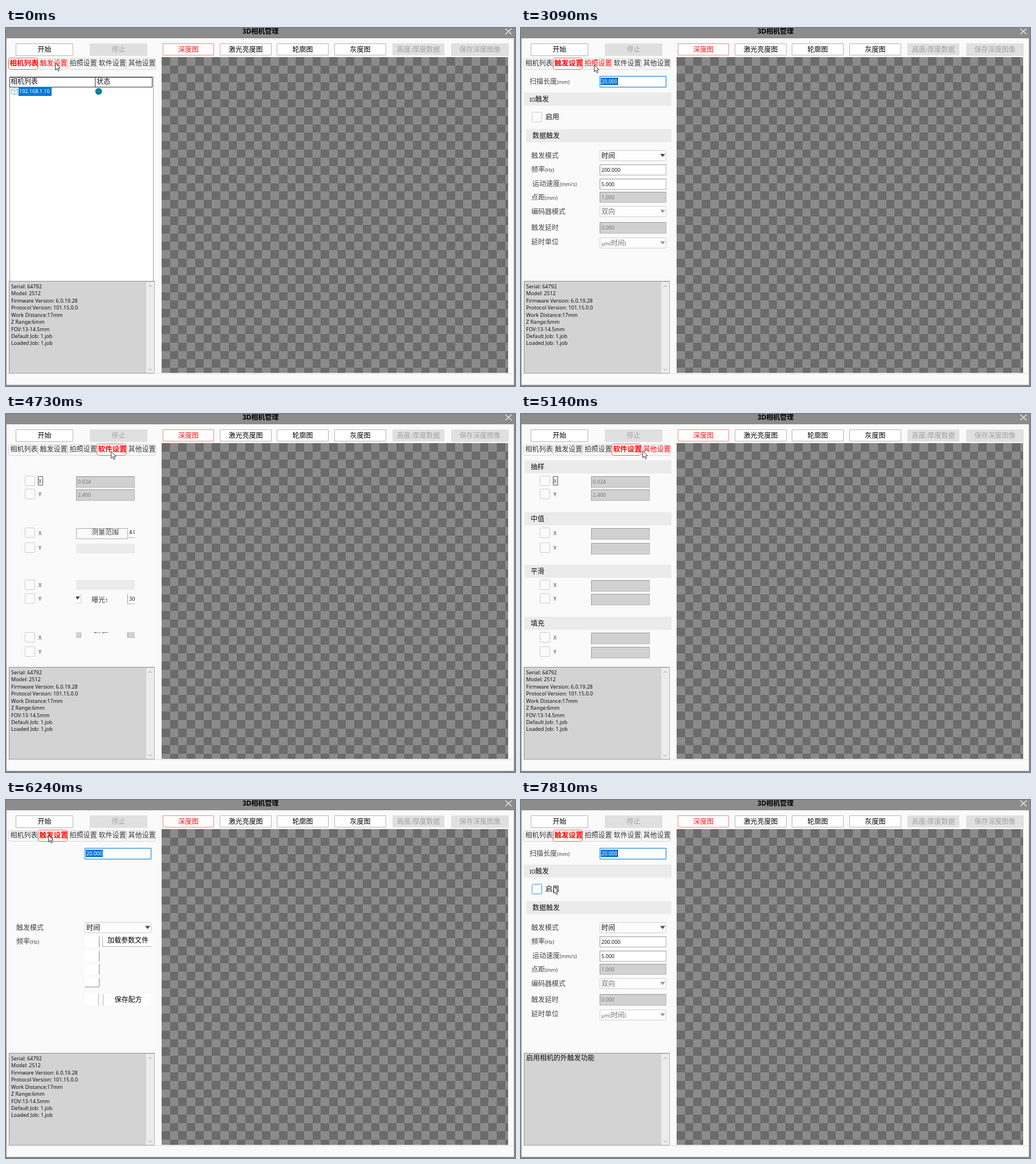
An HTML page with a canvas that plays this animation: 893x627 px, repeating every 8000 ms.

```html
<!DOCTYPE html>
<html lang="zh-CN">
<head>
<meta charset="utf-8">
<style>
html, body { margin: 0; width: 100%; height: 100%; overflow: hidden; background: #fafafa; }
canvas { display: block; }
</style>
</head>
<body>
<canvas id="stage" width="893" height="627"></canvas>
<script>
const ctx = document.getElementById('stage').getContext('2d');
const LOOP = 8000, STEP = 70;
const FONT = '"Noto Sans", "Noto Sans CJK SC", "Noto Sans CJK", sans-serif';
const BG = '#fafafa', LABEL = '#444', DIM = '#777', BLUE = '#0078d7', RED = '#f00';

// ---------- helpers ----------
function box(x, y, x2, y2, fill, stroke, r = 0) {
  ctx.beginPath();
  ctx.roundRect(x + .5, y + .5, x2 - x - 1, y2 - y - 1, r);
  if (fill) {
    ctx.fillStyle = fill;
    if (stroke || r) ctx.fill(); else ctx.fillRect(x, y, x2 - x, y2 - y);
  }
  if (stroke) { ctx.strokeStyle = stroke; ctx.lineWidth = 1; ctx.stroke(); }
}

function poly(points, fill, stroke, width = 1) {
  ctx.beginPath();
  points.forEach(([x, y]) => ctx.lineTo(x, y));
  if (fill) { ctx.closePath(); ctx.fillStyle = fill; ctx.fill(); }
  if (stroke) { ctx.strokeStyle = stroke; ctx.lineWidth = width; ctx.stroke(); }
}

// Latin runs are set smaller than Chinese ones; y is the middle of the line.
function text(str, x, y, color = '#111', { size = 12, small = 9, bold, center } = {}) {
  const runs = str.match(/[\x00-\xff]+|[^\x00-\xff]+/g) || [];
  const setFont = run =>
    ctx.font = `${bold ? 'bold ' : ''}${run.charCodeAt(0) < 256 ? small : size}px ${FONT}`;
  const widths = runs.map(run => (setFont(run), ctx.measureText(run).width));
  const hasChinese = /[^\x00-\xff]/.test(str);
  if (center) x -= widths.reduce((a, b) => a + b, 0) / 2;
  ctx.fillStyle = color;
  runs.forEach((run, i) => {
    setFont(run);
    ctx.fillText(run, x, Math.round(y + (hasChinese ? 4.3 : 3.3)));
    x += widths[i];
  });
}

function clipped(rects, draw) {
  ctx.save();
  ctx.beginPath();
  rects.forEach(([x, y, x2, y2]) => ctx.rect(x, y, x2 - x, y2 - y));
  ctx.clip();
  draw();
  ctx.restore();
}

// What is left of the previous page inside controls not yet repainted.
const leftover = (page, rects) => clipped(rects, () => {
  box(0, 75, 270, 443, BG);
  page();
});

function button(x, y, x2, y2, label, style = '') {
  const off = style === 'off', on = style === 'on';
  box(x, y, x2, y2, off ? '#e0e0e0' : '#fff', off ? '' : on ? '#f08888' : '#b4b4b4');
  text(label, (x + x2) / 2, (y + y2) / 2, off ? '#a2a2a2' : on ? '#f01818' : '#000', { center: true });
}

function bar(x, y, label, labelX) {
  box(x, y, 264, y + 23, '#ebebeb');
  text(label, labelX, y + 12);
}

function input(x, y, x2, y2, value = '', off) {
  box(x, y, x2, y2, off ? '#d1d1d1' : '#fff', off ? '#b8b8b8' : '#b0b0b0');
  poly([[x + .5, y2], [x + .5, y + .5], [x2, y + .5]], '', '#999');
  text(value, x + 3, (y + y2) / 2, off ? DIM : '#111');
}

function combo(x, y, x2, y2, value, off) {
  box(x, y, x2, y2, '#fdfdfd', '#cfcfcf', 1);
  const cy = (y + y2) / 2;
  poly([[x2 - 11, cy - 3], [x2 - 2, cy - 3], [x2 - 6.5, cy + 2.5]], off ? '#999' : '#54435f');
  text(value, x + 3, cy, off ? '#707070' : '#111');
}

const check = (x, y, hot) => box(x, y, x + 18, y + 18, '#fbfbfb', hot ? '#3c96d8' : '#cbcbcb', 1);

function selected(value, x, y, x2, y2) {
  box(x, y, x2, y2, BLUE);
  text(value, x + 1, (y + y2) / 2, '#fff');
}

// ---------- pages ----------
function listPage() {
  box(6, 85, 259, 443, '#fff');
  poly([[6.5, 443], [6.5, 85.5], [258.5, 85.5], [258.5, 443]], '', '#9a9a9a');
  box(6, 86, 257, 104, '#fff', '#333');
  box(156, 86, 157, 104, '#333');
  text('相机列表', 8, 94);
  text('状态', 159, 94);
  poly([[15, 105], [20.5, 107.5], [20.5, 114], [15, 117], [9.5, 114], [9.5, 107.5], [15, 105]], '', '#5b9bc8', .8);
  poly([[9.5, 107.5], [15, 110], [20.5, 107.5]], '', '#5b9bc8', .8);
  poly([[15, 110], [15, 117]], '', '#5b9bc8', .8);
  selected('192.168.1.10', 22, 103, 80, 119);
  ctx.beginPath();
  ctx.arc(162.5, 111, 6, 0, 7);
  ctx.fillStyle = '#0c8296';
  ctx.fill();
}

const triggerInputs = [
  [239, 258, '200.000'], [264, 283, '5.000'], [287, 306, '1.000', true], [340, 360, '0.000', true]
];
const triggerLabels = [
  ['触发模式', 18, 224], ['频率(Hz)', 18, 248], ['运动速度(mm/s)', 20, 273], ['点距(mm)', 18, 297],
  ['编码器模式', 18, 322], ['触发延时', 18, 350], ['延时单位', 18, 375]
];

function triggerPage({ partial, previous, caret, hot } = {}) {
  box(138, 84, 255, 104, '#fff', BLUE);
  selected('20.000', 140, 87, 170, 100);
  if (caret) box(169, 87, 170, 99, '#111');
  combo(138, 214, 255, 233, '时间');
  triggerLabels.slice(0, partial ? 2 : 7).forEach(([s, x, y]) => text(s, x, y, LABEL));
  if (partial) {
    leftover(previous, [...triggerInputs.map(([y, y2]) => [138, y, 255, y2]), [138, 312, 255, 331]]);
    return;
  }
  text('扫描长度(mm)', 15, 94, LABEL);
  bar(5, 113, 'IO触发', 15);
  check(19, 147, hot);
  text('启用', 43, 156);
  bar(9, 177, '数据触发', 20);
  triggerInputs.forEach(([y, y2, value, off]) => input(138, y, 255, y2, value, off));
  combo(138, 312, 255, 331, '双向', true);
  combo(138, 367, 255, 386, 'µm(时间)', true);
}

function photoPage() {
  bar(6, 81, '有效区域', 17);
  text('测量范围', 150, 207, LABEL);
  input(213, 196, 262, 217, '4.000');
  bar(6, 225, '间隔', 17);
  bar(6, 288, '曝光', 17);
  text('模式', 18, 325, LABEL);
  combo(60, 313, 132, 332, '单次');
  text('曝光1', 150, 326, LABEL);
  input(213, 314, 262, 333, '30');
  text('步数', 18, 380, LABEL);
  input(60, 372, 132, 392, '', true);
  text('曝光2', 150, 379, LABEL);
  input(213, 372, 262, 392, '', true);
}

const softRows = [109, 132, 200, 226, 291, 315, 383, 408];

function softPage({ partial, previous } = {}) {
  softRows.forEach((y, i) => {
    check(33, y - 1, false);
    text('XY'[i % 2], 57, y + 8.5, '#5b2b4b');
    if (i < 2 || !partial) input(123, y, 226, y + 20, ['0.024', '2.400'][i], true);
  });
  box(56, 109, 65, 125, '', '#555');
  if (partial) {
    leftover(previous, [[123, 200, 226, 219], [123, 227, 226, 244], [123, 291, 226, 308],
      [123, 315, 226, 333], [123, 382, 226, 392]]);
    box(123, 200, 214, 219, '', '#aaa');
  } else {
    ['抽样', '中值', '平滑', '填充'].forEach((s, i) => bar(6, 81 + 91.5 * i | 0, s, 17));
  }
}

const programs = ['1', '122', '22', '33', '4444', '8975222', 'VISIONAssembly', '哦', '我', '问问'];

function otherPage({ caret } = {}) {
  bar(6, 81, '配方', 17);
  text('当前配方', 18, 121, LABEL);
  box(79, 111, 163, 133, '#d3d3d3', '#3a96dd');
  selected('1', 81, 114, 88, 127);
  if (caret) box(88, 114, 89, 127, '#111');
  box(18, 140, 164, 328, '#fff', '#8a8a8a');
  const shade = ctx.createLinearGradient(0, 142, 0, 159);
  shade.addColorStop(0, '#a6a6a6');
  shade.addColorStop(1, '#707070');
  box(19, 142, 163, 160, shade, '#666');
  box(62, 142, 63, 159, '#444');
  text('No.', 22, 151, '#f2f2f2');
  text('Program', 65, 151, '#f2f2f2');
  programs.forEach((name, i) => {
    const y = 168.5 + 15.4 * i;
    text(String(i), 24, y);
    text(name, 67, y);
  });
  ['切换配方', '删除配方', '保存参数文件', '加载参数文件'].forEach((s, i) => {
    const y = Math.round(141 + 31.3 * i);
    button(169, y, 259, y + 22, s);
  });
  text('名称', 18, 348, LABEL);
  input(79, 339, 163, 361);
  button(170, 339, 259, 361, '保存配方');
}

// ---------- timeline ----------
// start, page, tab index, time spent half repainted
const visits = [
  [0, listPage, 0, 0], [670, triggerPage, 1, 70], [3430, photoPage, 2, 0],
  [4660, softPage, 3, 140], [5400, otherPage, 4, 0], [6240, triggerPage, 1, 70]
];
// start, end, x, y reached
const moves = [
  [1210, 1410, 90, 66], [2000, 2270, 76, 68], [2470, 3090, 128, 64], [4040, 4600, 184, 65],
  [4870, 5400, 238, 64], [5540, 5610, 257, 64], [5680, 6090, 74, 61], [6640, 7260, 48, 146],
  [7460, 7810, 57, 151]
];

function cursorAt(t) {
  let x = 86, y = 61;
  for (const [start, end, toX, toY] of moves) {
    if (t < start) break;
    const held = (Math.floor((t - start) / STEP) + 1) * STEP;
    const p = Math.min(1, held / (end - start));
    const eased = p * p * (3 - 2 * p);
    x += (toX - x) * eased;
    y += (toY - y) * eased;
  }
  return [Math.round(x), Math.round(y)];
}

// ---------- window parts ----------
function windowFrame() {
  box(0, 0, 893, 627, '#8c8c8c');
  box(1, 18, 891, 625, BG);
  text('3D相机管理', 446.5, 6, '#000', { bold: true, small: 12, center: true });
  poly([[876, 1], [887, 11]], '', '#f4f4f4', 1.1);
  poly([[887, 1], [876, 11]], '', '#f4f4f4', 1.1);
  box(1, 605, 891, 606, '#dcdcdc');
  button(17, 27, 118, 49, '开始');
  button(147, 27, 248, 49, '停止', 'off');
  button(275, 27, 365, 48, '深度图', 'on');
  button(375, 27, 466, 48, '激光亮度图');
  button(475, 27, 566, 48, '轮廓图');
  button(576, 27, 667, 48, '灰度图');
  button(678, 27, 769, 48, '高度/厚度数据', 'off');
  button(781, 27, 882, 49, '保存深度图像', 'off');
}

function checkerboard() {
  const cell = 14.7;
  clipped([[273, 51, 881, 604]], () => {
    box(273, 51, 881, 604, '#8b8b8b');
    for (let row = 0; row < 38; row++)
      for (let col = row % 2; col < 42; col += 2) {
        const x = Math.round(273 + col * cell), y = Math.round(51 + row * cell);
        box(x, y, Math.round(273 + (col + 1) * cell), Math.round(51 + (row + 1) * cell), '#6b6b6b');
      }
  });
}

function tabs(active, mx, my) {
  ['相机列表', '触发设置', '拍照设置', '软件设置', '其他设置'].forEach((label, i) => {
    const x = Math.round(4.4 + 51.6 * i), on = i === active;
    const hover = mx >= x && mx < x + 51 && my >= 53 && my < 73;
    box(x, on ? 52 : 53, x + 52, 73, on ? '#fff' : '#f8f8f8', on ? '#f55' : '#d6d6d6', 3);
    clipped([[x, 50, x + 52, 76]], () =>
      text(label, x + (on ? 2.5 : 3.5), 62, on || hover ? RED : '#333', { bold: on, size: on ? 12.5 : 12 }));
  });
}

const cameraInfo = ['Serial: 64792', 'Model: 2512', 'Firmware Version: 6.0.19.28',
  'Protocol Version: 101.15.0.0', 'Work Distance:17mm', 'Z Range:6mm', 'FOV:13-14.5mm',
  'Default Job: 1.job', 'Loaded Job: 1.job'];

function infoPanel(t) {
  box(5, 443, 261, 605, '#d3d3d3', '#b0b0b0');
  poly([[5.5, 605], [5.5, 443.5], [261, 443.5]], '', '#8f8f8f');
  box(246, 445, 260, 604, '#ececec');
  poly([[250, 453.5], [253, 450.5], [256, 453.5]], '', '#999');
  poly([[250, 596.5], [253, 599.5], [256, 596.5]], '', '#999');
  if (t < 7190) cameraInfo.forEach((s, i) => text(s, 9, 452.5 + 12.45 * i));
  else if (t >= 7460) text('启用相机的外触发功能', 9, 452);
}

function tooltip(x, y) {
  box(x + 2, y + 2, x + 54, y + 18, '#aaa');
  box(x, y, x + 52, y + 17, '#fffff0', '#555');
  text('触发设置', x + 2, y + 8.5, '#222');
}

function pointer(x, y) {
  const shape = [[0, 0], [0, 12], [2.8, 9.5], [4.8, 14], [6.7, 13.1], [4.8, 8.8], [8.5, 8.6], [0, 0]];
  poly(shape.map(([dx, dy]) => [x + dx + .5, y + dy + .5]), '#fff', '#222', .9);
}

function render(t) {
  const index = visits.findLastIndex(([start]) => t >= start);
  const [start, page, tab, repaint] = visits[index];
  const [mx, my] = cursorAt(t);
  windowFrame();
  checkerboard();
  tabs(tab, mx, my);
  page({
    partial: t < start + repaint,
    previous: index ? visits[index - 1][1] : null,
    caret: Math.floor((t - start - 10) / 530) % 2 === 0,
    hot: mx >= 19 && mx < 68 && my >= 147 && my < 166
  });
  infoPanel(t);
  if (t >= 200 && t < 600) tooltip(78, 92);
  if (t >= 1410 && t < 2070) tooltip(85, 84);
  pointer(mx, my);
}

function tick(now) {
  render(now % LOOP);
  requestAnimationFrame(tick);
}
tick(performance.now());
</script>
</body>
</html>
```
